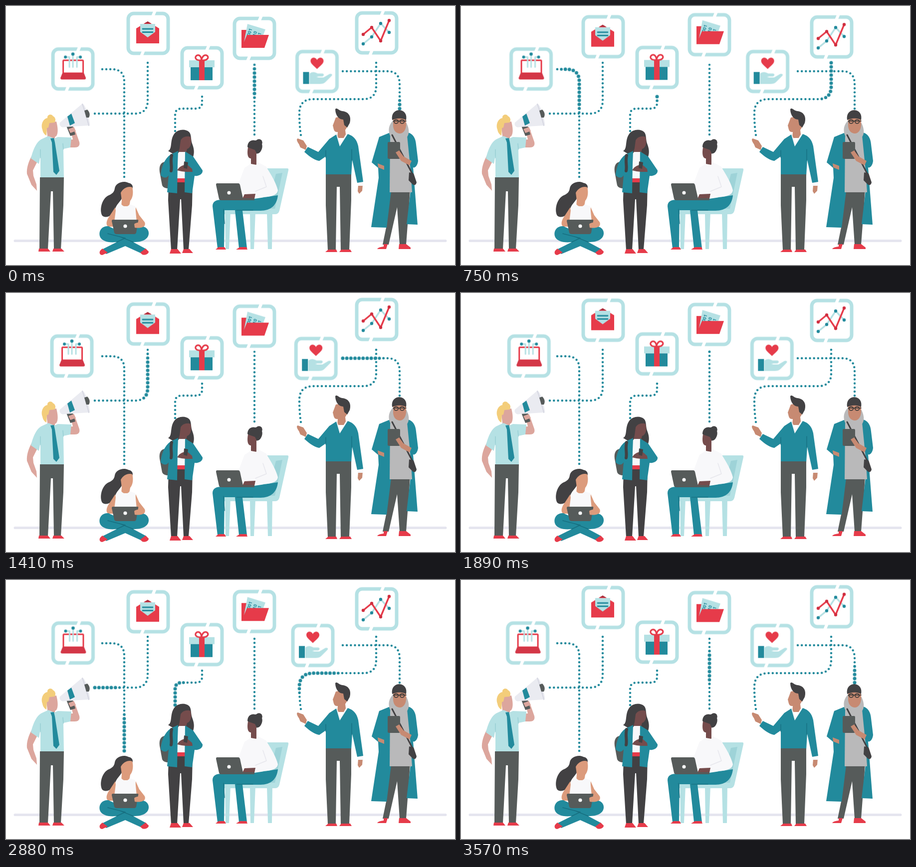
Animation, 900 px wide and 520 px high, one loop 3600 ms. Source, as an HTML page:

```html
<!DOCTYPE html>
<html lang="en">
<head>
<meta charset="utf-8">
<title>Connected people</title>
<style>
html, body { margin: 0; width: 100%; height: 100%; overflow: hidden; background: #fff; }
svg { display: block; width: 900px; height: 520px; }
.teal { fill: #228a9c; }
.light { fill: #b5e1e4; }
.red { fill: #e63b4a; }
.gray { fill: #565b5a; }
.dark { fill: #424143; }
.white { fill: #fff; }
.pale { fill: #f8f8fa; }
.rose { fill: #dca69d; }
.tan { fill: #dc9b7c; }
.brown { fill: #c78a72; }
.deep { fill: #754c4c; }
.blond { fill: #f3cd7a; }
.scarf { fill: #b9b9ba; }
.line { fill: none; stroke-linecap: round; stroke-linejoin: round; }
.bob { animation: bob 900ms cubic-bezier(.65, 0, .35, 1) infinite alternate; }
.x { --to: translate(9px, 0); }
.y { --to: translate(0, 9.3px); }
@keyframes bob { from { transform: none; } to { transform: var(--to); } }
#dots circle { fill: #228a9c; transform-box: fill-box; transform-origin: center; animation: pulse 1800ms linear infinite; }
#dots .short { animation-name: blip; }
@keyframes pulse { 0%, 13.6%, 100% { transform: none; } 2%, 11.6% { transform: scale(1.6); } }
@keyframes blip { 0%, 5.5%, 100% { transform: none; } 1%, 4.5% { transform: scale(1.6); } }
text { font: 700 9px "Open Sans", sans-serif; fill: #228a9c; }
</style>
</head>
<body>
<svg viewBox="0 0 900 520">
<defs>
  <g id="frame">
    <rect x="-40" y="-40" width="80" height="80" rx="11" fill="#fff" stroke="#b5e1e4" stroke-width="7"/>
    <path d="M9 -34L14 -46M-14 46L-9 34" stroke="#fff" stroke-width="6"/>
  </g>
</defs>

<path d="M18 471.500H881" class="line" stroke="#e5e5ef" stroke-width="5"/>
<g id="dots"></g>

<!-- icons -->
<g transform="translate(132 126.500)"><g class="bob x" style="animation-delay:-350ms">
  <use href="#frame"/>
  <path class="red" d="M-21 -16Q-21 -19 -18 -19H19Q22 -19 22 -16V9H-21Z"/>
  <path class="white" d="M-18 -16H19V7H-18Z"/>
  <path d="M-21 8H22L26 18Q26 21 23 21H-22Q-25 21 -25 18Z" fill="#d33747"/>
  <path d="M-15 -24H-7V-4M0 -29V-4M14 -24H8V-4" class="line" stroke="#b5e1e4" stroke-width="3"/>
  <g class="teal"><circle cx="-15" cy="-24" r="3"/><circle cy="-30" r="3.300"/><circle cx="15" cy="-24" r="3"/></g>
</g></g>

<g transform="translate(285 54.500)"><g class="bob y" style="animation-delay:-1600ms">
  <use href="#frame"/>
  <path class="red" d="M-24 -10L-1 -24L22 -10V20H-24Z"/>
  <path d="M-8 -20L-1 -24L6 -20Z" fill="#a92c3a"/>
  <path class="light" d="M-16 -19H14V-3L-1 8L-16 -3Z"/>
  <path d="M-11 -9H9M-11 -2.500H9" class="line" stroke="#228a9c" stroke-width="2.800"/>
</g></g>

<g transform="translate(393 121)"><g class="bob y" style="animation-delay:-1410ms">
  <use href="#frame"/>
  <path class="teal" d="M-23 -2H21V25H-23Z"/>
  <path class="light" d="M-26 -15H25V-1H-26Z"/>
  <path class="red" d="M-6 -15H5V25H-6Z"/>
  <path d="M-1 -15C-14 -14 -16 -22 -10 -25C-4 -27 -1 -20 -1 -15C-1 -20 3 -27 9 -25C15 -22 12 -14 -1 -15Z" class="line" stroke="#e63b4a" stroke-width="3.200"/>
</g></g>

<g transform="translate(498 57.300)"><g class="bob y" style="animation-delay:-1215ms">
  <use href="#frame"/>
  <path class="red" d="M-26 -17H-16L-13 -13V19H-26Z"/>
  <path class="light" d="M-14 -29L22 -18L12 8H-21Z"/>
  <g transform="rotate(-72)"><text x="-4" y="-10">1001</text><text x="-1" y="1">010</text><text x="-1" y="10">101</text></g>
  <path class="red" d="M-15 -7H29L20 19H-26Z"/>
</g></g>

<g transform="translate(614.500 131.500)"><g class="bob x" style="animation-delay:-930ms">
  <use href="#frame"/>
  <path class="red" d="M0 -5C-7 -12 -13 -16 -13 -21C-13 -29 -3 -30 0 -23C3 -30 13 -29 13 -21C13 -16 7 -12 0 -5Z"/>
  <path class="teal" d="M-28 1H-16V25H-28Z"/>
  <path class="light" d="M-15 4C-8 -1 -3 2 1 4H10C15 4 15 10 10 10H2V12H13L25 5C29 4 32 6 29 9L17 21C14 24 10 25 5 25H-15Z"/>
  <path d="M0 11H10Q14 10 14 7" class="line" stroke="#fff" stroke-width="1.200"/>
</g></g>

<g transform="translate(743 53)"><g class="bob y" style="animation-delay:-260ms">
  <use href="#frame"/>
  <path d="M-27 22L-10 8L8 -19L25 -1" class="line" stroke="#b5e1e4" stroke-width="3.400"/>
  <g class="teal"><circle cx="-27" cy="22" r="3.200"/><circle cx="-10" cy="8" r="3.200"/><circle cx="8" cy="-19" r="3.200"/><circle cx="25" cy="-1" r="3.200"/></g>
  <path d="M-27 3L-10 -11L8 16L25 -25" class="line" stroke="#e63b4a" stroke-width="3.400"/>
  <g fill="#d02f40"><circle cx="-27" cy="3" r="3.200"/><circle cx="-10" cy="-11" r="3.200"/><circle cx="8" cy="16" r="3.200"/><circle cx="25" cy="-25" r="3.200"/></g>
</g></g>

<!-- man with megaphone -->
<g>
  <path class="rose" d="M52 300C45 313 41 325 42 337L51 359L62 371L61 358L55 341L54 330L65 308Z"/>
  <path class="rose" d="M124 268L134 268L130 252C127 246 131 242 136 243L140 253L147 273C149 281 144 284 138 284L126 284Z"/>
  <path class="rose" d="M80 234L101 232C104 244 105 255 101 261L98 263V270H84Z"/>
  <path class="blond" d="M73 248C69 237 75 226 83 225C82 217 92 216 94 221C99 223 101 230 97 234L87 235L85 244L82 245L81 260C77 258 74 254 73 248Z"/>
  <path class="light" d="M72 267L85 261L97 266L104 263L131 264L129 284L115 287L116 346H69V300L66 317L50 306C54 289 61 272 72 267Z"/>
  <path d="M69 288V305M114 276L115 288" class="line" stroke="#91cbd1" stroke-width="1.200"/>
  <path class="teal" d="M89 266L96 265L98 274L107 331L101 339L95 333L92 274Z"/>
  <path class="gray" d="M68 344H116L115 400L110 488H96L94 372H90L84 488H67Z"/>
  <path class="red" d="M66 487H84L89 493H65ZM95 487H111L117 493H93Z"/>
  <path class="gray" d="M121 241L133 238L139 258L129 261Z"/>
  <path class="rose" d="M125 247L136 243L140 251L129 255Z"/>
  <path d="M108 234L152 197C155 193 161 205 165 222C169 237 169 242 165 240L118 243C111 245 106 240 108 234Z" fill="#eaebf1"/>
  <path d="M153 197C158 210 162 225 166 240" class="line" stroke="#d6d7e1" stroke-width="2"/>
  <path class="teal" d="M123 222L131 216L138 235L128 240Z"/>
  <path class="gray" d="M157 210L163 208C168 213 169 219 166 224L161 224Z"/>
</g>

<!-- woman on the floor -->
<g>
  <path class="dark" d="M218 366C220 355 235 350 245 355C256 357 256 367 250 370L234 381C231 393 223 395 219 407C215 420 202 428 193 421C187 411 191 389 204 381C214 377 217 373 218 366Z"/>
  <path class="tan" d="M230 375C235 365 246 361 253 364C256 374 254 386 249 391L247 402H231L232 390Z"/>
  <path class="tan" d="M219 404L208 421C201 430 199 441 206 443H216L222 426ZM260 404L267 420L278 434C281 441 275 445 268 445L257 442L264 436L257 426Z"/>
  <path class="pale" d="M221 402L231 398C236 404 244 404 248 398L259 402L262 434H217Z"/>
  <path class="teal" d="M205 442C193 441 185 451 188 462C191 472 205 476 222 474L192 489L201 498L239 482L272 497L281 488L255 474C276 475 287 466 286 455C285 444 273 439 260 445L240 458Z"/>
  <path d="M204 457L239 466L222 474M255 474L228 463" class="line" stroke="#176f80" stroke-width="1.600"/>
  <path class="red" d="M193 487L204 495L193 500C188 500 186 495 189 491ZM280 487L286 493C286 498 279 501 273 499L269 495Z"/>
  <path class="gray" d="M214 429H264Q266 429 265 432L261 455Q260 458 257 458H222Q218 458 217 455L212 432Q212 429 214 429Z"/>
  <path class="tan" d="M257 438C263 433 274 434 278 438C279 444 269 447 258 445Z"/>
  <circle class="white" cx="239" cy="442" r="3.600"/>
</g>

<!-- woman with phone -->
<g>
  <path class="gray" d="M324 313C312 311 306 319 308 333L313 360Q316 367 328 366Z"/>
  <path class="dark" d="M325 291C334 287 328 270 337 257C344 247 360 246 367 253C372 258 370 267 373 276C377 286 378 294 375 303L340 300Z"/>
  <path class="deep" d="M350 270C353 262 364 260 370 263C373 275 370 285 363 287L360 298H345L348 285Z"/>
  <path class="pale" d="M341 300L347 293H361L365 352H342Z"/>
  <path class="red" d="M342 346H362V356H342Z"/>
  <path class="dark" d="M326 354H374L373 400L366 489H356L351 388H349L343 490H331L325 390Z"/>
  <path class="teal" d="M345 291L330 298C317 307 311 325 310 340C317 347 323 345 326 340L323 374L343 376L344 318ZM359 292L375 302L394 330C395 337 387 342 378 341L373 376L358 374Z"/>
  <path d="M332 300C329 312 333 321 331 331" class="line" stroke="#424143" stroke-width="6"/>
  <path class="deep" d="M343 330C348 321 357 318 364 319L373 327L374 333H361L352 332Z"/>
  <path class="dark" d="M357 312L365 314L363 327L356 325Z"/>
  <path class="red" d="M331 488H344L351 497H328ZM356 488H368L375 496H353Z"/>
</g>

<!-- woman on the chair -->
<g>
  <path class="light" d="M523 326H564Q567 326 566 330L548 411Q546 418 540 418H438V409H512Z"/>
  <path d="M541 337L554 335L539 407H523Z" fill="#9ed3d8"/>
  <path class="light" d="M439 414H450L447 488H440ZM489 414H500L497 488H490ZM523 414H534L533 488H525Z"/>
  <circle class="dark" cx="507" cy="274" r="6.800"/>
  <path class="dark" d="M484 283C484 273 491 268 499 270C511 268 518 279 511 291C508 297 502 298 497 294Z"/>
  <path class="deep" d="M485 284L499 289L502 295V319L491 317V306C484 306 483 296 485 284Z"/>
  <path class="teal" d="M498 387L545 380C543 400 531 411 510 411H474L483 486H467L459 410H438L437 486H424L414 402C414 393 420 389 432 389Z"/>
  <path d="M462 410H495M436 408L438 437" class="line" stroke="#1a7485" stroke-width="1.400"/>
  <path class="pale" d="M490 317C497 323 503 319 505 314L521 322C531 338 541 354 545 370C544 379 533 382 524 383L483 386L466 357L478 325Z"/>
  <path d="M515 342L522 363L500 372" class="line" stroke="#e6e6ec" stroke-width="1.400"/>
  <path class="deep" d="M478 378L500 377L498 387H474Z"/>
  <path class="gray" d="M423 356H466Q468 356 469 359L475 386H498V390H431Q428 390 427 387L421 359Q421 356 423 356Z"/>
  <circle class="white" cx="447" cy="375" r="3.500"/>
  <path class="red" d="M426 484H438L441 489H420ZM469 484H482L484 489H461Z"/>
</g>

<!-- man in sweater -->
<g>
  <path class="brown" d="M603 281L596 270L585 266C581 267 584 273 587 277L590 284L601 289Z"/>
  <path class="brown" d="M706 359H715L714 371L708 377L705 372Z"/>
  <path class="brown" d="M661 224L680 220L685 241L680 249L682 265H664L665 253C656 254 657 245 655 240Z"/>
  <path class="dark" d="M660 207C664 203 666 210 674 211C686 212 693 221 689 235L684 244L678 239L676 228C667 228 660 219 660 207Z"/>
  <path class="pale" d="M663 258L671 275L682 256L687 263L670 288L659 263Z"/>
  <path class="pale" d="M704 351H716V361H705Z"/>
  <path class="teal" d="M662 258L669 282L685 257C697 261 703 268 706 281L716 353L704 355L694 309L692 341H641V302L628 311C619 310 608 302 598 293L605 283L626 293L648 267Z"/>
  <path d="M693 288V310M641 290V304" class="line" stroke="#176f80" stroke-width="1.300"/>
  <path class="gray" d="M641 338H692V390L688 490H671L669 363H663L661 490H645L641 400Z"/>
  <path class="red" d="M646 489H662L664 494H640ZM672 489H690L693 494H668Z"/>
</g>

<!-- woman with tablet -->
<g>
  <path class="gray" d="M767 368H810L808 400L802 479H789L784 404L767 479H755L763 440Z"/>
  <path class="teal" d="M770 254L748 263L733 314L746 325L747 345L732 444L763 445L772 372L776 268ZM803 253C816 256 821 265 822 278L826 311C825 321 819 326 816 324L825 439L803 438L811 370L796 260Z"/>
  <path class="scarf" d="M770 262L804 260L811 330L814 374H769Z"/>
  <path class="scarf" d="M775 231C767 239 766 250 769 258C774 273 784 278 792 271C803 269 809 258 807 248C806 239 802 234 799 228Z"/>
  <path class="brown" d="M776 224H802V240C801 250 796 256 789 256C781 255 777 250 776 241Z"/>
  <path class="dark" d="M774 229C772 216 779 209 789 209C800 210 804 219 802 229C793 224 783 225 774 229Z"/>
  <g class="line" stroke="#333" stroke-width="1.600"><path d="M776 231H802"/><ellipse cx="782" cy="232" rx="4.300" ry="3.700"/><ellipse cx="794" cy="232" rx="4.300" ry="3.700"/></g>
  <path d="M774 259L816 340" class="line" stroke="#424143" stroke-width="3"/>
  <path class="dark" d="M808 334L817 336L823 354Q822 361 816 359L807 350Z"/>
  <path class="brown" d="M745 316L758 321V329L746 324Z"/>
  <path class="gray" d="M767 273H788Q790 273 790 276V304Q790 307 787 307H768Q765 307 765 304V276Q765 273 767 273Z"/>
  <path class="brown" d="M781 294L788 290L797 302L813 311L809 320L792 311Z"/>
  <path class="red" d="M757 478H765L762 488H744Q746 484 757 483ZM788 478H802L811 485V488H787Z"/>
</g>
</svg>
<script>
const NS = "http://www.w3.org/2000/svg";
const PERIOD = 1800, GAP = 8.1;

// route, start of its pulse in ms, speed in px/ms, pulse class
const routes = [
  ["M193 127H212Q237 127 237 152V343", 510, .52, ""],
  ["M178 216H258Q284 216 284 190V114", 950, .42, ""],
  ["M393 182V194Q393 206 381 206H352Q339 206 339 219V251", 715, .4, ""],
  ["M498 258V118", 1612, .76, "short"],
  ["M675 131H765Q789 131 789 157V206", 1230, .47, ""],
  ["M742 114V161Q742 187 716 187H616Q588 187 588 215Q588 240 591 259", 575, .5, ""]
];

const dots = document.getElementById("dots");

function make(tag, attrs) {
  const el = document.createElementNS(NS, tag);
  for (const key in attrs) el.setAttribute(key, attrs[key]);
  return el;
}

for (const [d, start, speed, kind] of routes) {
  const path = make("path", { d });
  const length = path.getTotalLength();
  const count = Math.round(length / GAP);
  for (let i = 0; i <= count; i++) {
    const s = length * i / count;
    const { x, y } = path.getPointAtLength(s);
    const dot = make("circle", { cx: x, cy: y, r: 2.2, class: kind });
    dot.style.animationDelay = `${start + s / speed - 2 * PERIOD}ms`;
    dots.append(dot);
  }
}
</script>
</body>
</html>
```
